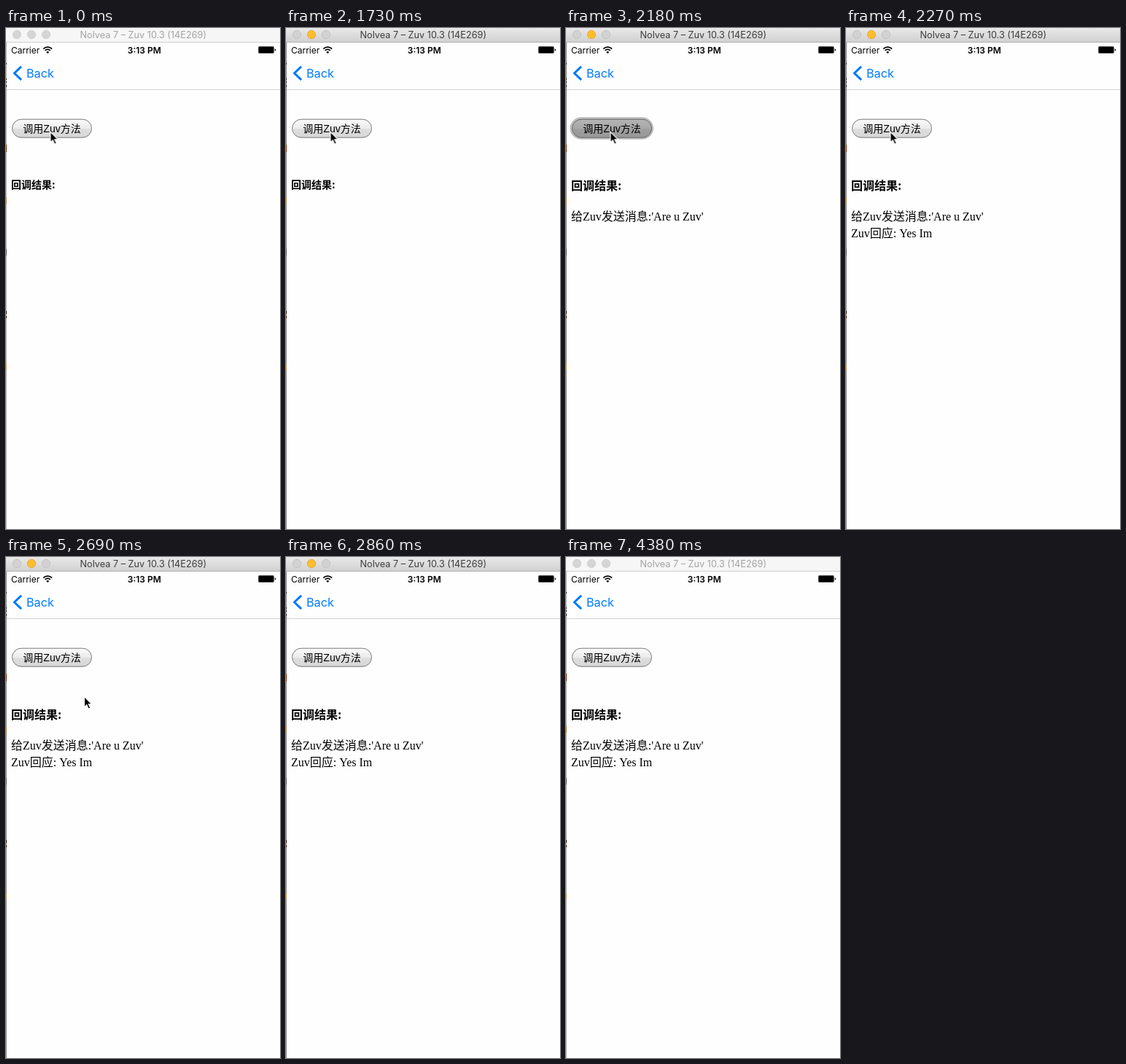
Write an HTML page that moves like this. It is 376 px wide and 687 px high and loops after 4.46 s.

```html
<!DOCTYPE html>
<html lang="zh">
<head>
<meta charset="utf-8">
<title>Callback demo</title>
<style>
  html, body { margin: 0; width: 100%; height: 100%; overflow: hidden; background: #fefefe; }
  svg { display: block; width: 376px; height: 687px; }
  text { white-space: pre; }

  .ui { font-family: Inter, Roboto, sans-serif; }
  .cjk { font-family: "Liberation Sans", "Noto Sans CJK SC", "Noto Sans CJK", sans-serif; }
  .body { font: 16px "Liberation Serif", "Noto Sans CJK SC", "Noto Sans CJK", serif; }
  .head { font-family: "Noto Sans CJK SC", "Noto Sans CJK", sans-serif; font-weight: 700; }

  .active, .before, .pressed, .sent, .reply, .cursor {
    animation: 4460ms step-end infinite;
  }
  .active { animation-name: active; }
  .before { animation-name: before; }
  .pressed { animation-name: pressed; }
  .sent { animation-name: sent; }
  .reply { animation-name: reply; }
  .cursor { animation-name: move; }

  @keyframes active { 0%, 98.206% { opacity: 0 } 38.789% { opacity: 1 } 100% { opacity: 0 } }
  @keyframes before { 0% { opacity: 1 } 48.879%, 100% { opacity: 0 } }
  @keyframes pressed { 0%, 50.897%, 100% { opacity: 0 } 48.879% { opacity: 1 } }
  @keyframes sent { 0% { opacity: 0 } 48.879%, 100% { opacity: 1 } }
  @keyframes reply { 0% { opacity: 0 } 50.897%, 100% { opacity: 1 } }
  @keyframes move {
    0% { transform: translate(60.5px, 142px); opacity: 1 }
    60.314% { transform: translate(107px, 191px); opacity: 1 }
    61.592% { transform: translate(206px, 400px); opacity: 1 }
    62.848% { transform: translate(304px, 620px); opacity: 1 }
    64.126%, 100% { transform: translate(304px, 620px); opacity: 0 }
  }
</style>
</head>
<body>
<svg viewBox="0 0 376 687" xmlns="http://www.w3.org/2000/svg">
  <defs>
    <linearGradient id="bar" x2="0" y2="1">
      <stop stop-color="#e9e9e9"/><stop offset="1" stop-color="#d1d1d1"/>
    </linearGradient>
    <linearGradient id="btn" x2="0" y2="1">
      <stop stop-color="#fbfbfb"/><stop offset=".5" stop-color="#ebebeb"/>
      <stop offset=".54" stop-color="#dedede"/><stop offset="1" stop-color="#d6d6d6"/>
    </linearGradient>
    <linearGradient id="down" x2="0" y2="1">
      <stop stop-color="#b4b4b4"/><stop offset=".5" stop-color="#a8a8a8"/>
      <stop offset=".54" stop-color="#9e9e9e"/><stop offset="1" stop-color="#989898"/>
    </linearGradient>
  </defs>

  <rect width="376" height="687" fill="#fefefe"/>

  <!-- inactive title bar -->
  <rect width="376" height="19" fill="#f6f6f6"/>
  <rect y="19" width="376" height="1" fill="#d0d0d0"/>
  <g fill="#d5d5d5" stroke="#cbcbcb" stroke-width=".7">
    <circle cx="15" cy="9" r="5.7"/><circle cx="35" cy="9" r="5.7"/><circle cx="55" cy="9" r="5.7"/>
  </g>
  <text class="ui" x="188.3" y="14" font-size="12.7" text-anchor="middle" fill="#a3a3a3">Nolvea 7 – Zuv 10.3 (14E269)</text>
  <rect y="20" width="1" height="667" fill="#b8b8b8"/>

  <!-- active title bar -->
  <g class="active">
    <rect width="376" height="19" fill="url(#bar)"/>
    <rect y="19" width="376" height="1" fill="#b1b1b1"/>
    <g fill="#d2d2d2" stroke="#bcbcbc" stroke-width=".7">
      <circle cx="15" cy="9" r="5.7"/>
      <circle cx="35" cy="9" r="5.7" fill="#fdbd2e" stroke="#dfa023"/>
      <circle cx="55" cy="9" r="5.7"/>
    </g>
    <text class="ui" x="188.3" y="14" font-size="12.7" text-anchor="middle" fill="#3c3c3c">Nolvea 7 – Zuv 10.3 (14E269)</text>
    <rect y="20" width="1" height="667" fill="#929292"/>
  </g>

  <!-- slivers of the window behind -->
  <g fill="#333">
    <rect y="48" width="1" height="2"/><rect y="69" width="1" height="2"/>
    <rect y="73" width="1" height="2"/><rect y="78" width="1" height="3"/>
    <rect y="160" width="1" height="10" fill="#8a3a14"/>
    <rect y="232" width="1" height="9" fill="#b98a4a"/>
    <rect y="303" width="1" height="9" fill="#666"/>
    <rect y="388" width="1" height="4" fill="#3a1c10"/><rect y="395" width="1" height="3" fill="#3a1c10"/>
    <rect y="461" width="1" height="8" fill="#d0a058"/>
  </g>

  <!-- status bar -->
  <text class="ui" x="7" y="34.5" font-size="12">Carrier</text>
  <g fill="none" stroke="#000" stroke-width="1.7">
    <path d="M51.3 28.7a8.2 8.2 0 0 1 11.8 0M53.5 31a5.2 5.2 0 0 1 7.4 0"/>
    <path d="M57.2 35l-2-2.1a2.9 2.9 0 0 1 4 0z" fill="#000" stroke="none"/>
  </g>
  <text class="ui" x="189.8" y="34.5" font-size="12" font-weight="600" text-anchor="middle">3:13 PM</text>
  <rect x="346" y="25" width="22" height="10" rx="2" fill="#555"/>
  <rect x="347" y="26" width="20" height="8" rx="1"/>
  <path d="M368.8 28.2q1.5.5 1.5 1.8t-1.5 1.8z"/>

  <!-- navigation bar -->
  <path d="M21 52.8L11.5 62L21 71.2" fill="none" stroke="#007aff" stroke-width="3"/>
  <text class="ui" x="28" y="68" font-size="16.2" fill="#007aff">Back</text>
  <rect x="1" y="84" width="375" height="1" fill="#d2d2d2"/>

  <!-- button -->
  <rect x="8.5" y="125.2" width="109" height="25" rx="12.5" fill="url(#btn)" stroke="#777"/>
  <g class="pressed">
    <rect x="5.5" y="122.2" width="114.5" height="30.6" rx="15.3" fill="#bdbdbd"/>
    <rect x="8.5" y="125.2" width="109" height="25" rx="12.5" fill="url(#down)" stroke="#686868"/>
  </g>
  <text class="cjk" x="63" y="143" font-size="14" text-anchor="middle">调用Zuv方法</text>

  <!-- result -->
  <text class="head before" x="7" y="219.5" font-size="14">回调结果:</text>
  <g class="sent">
    <text class="head" x="7" y="222" font-size="16">回调结果:</text>
    <text class="body" x="7" y="264">给Zuv发送消息:'Are u Zuv'</text>
  </g>
  <text class="body reply" x="7" y="287">Zuv回应: Yes Im</text>

  <path class="cursor" d="M.5 .5V14.8L3.8 11.7L6.2 17.2L8.7 16.1L6.3 10.8H10.8Z" stroke="#fff" stroke-width="1.1"/>
</svg>
</body>
</html>
```
